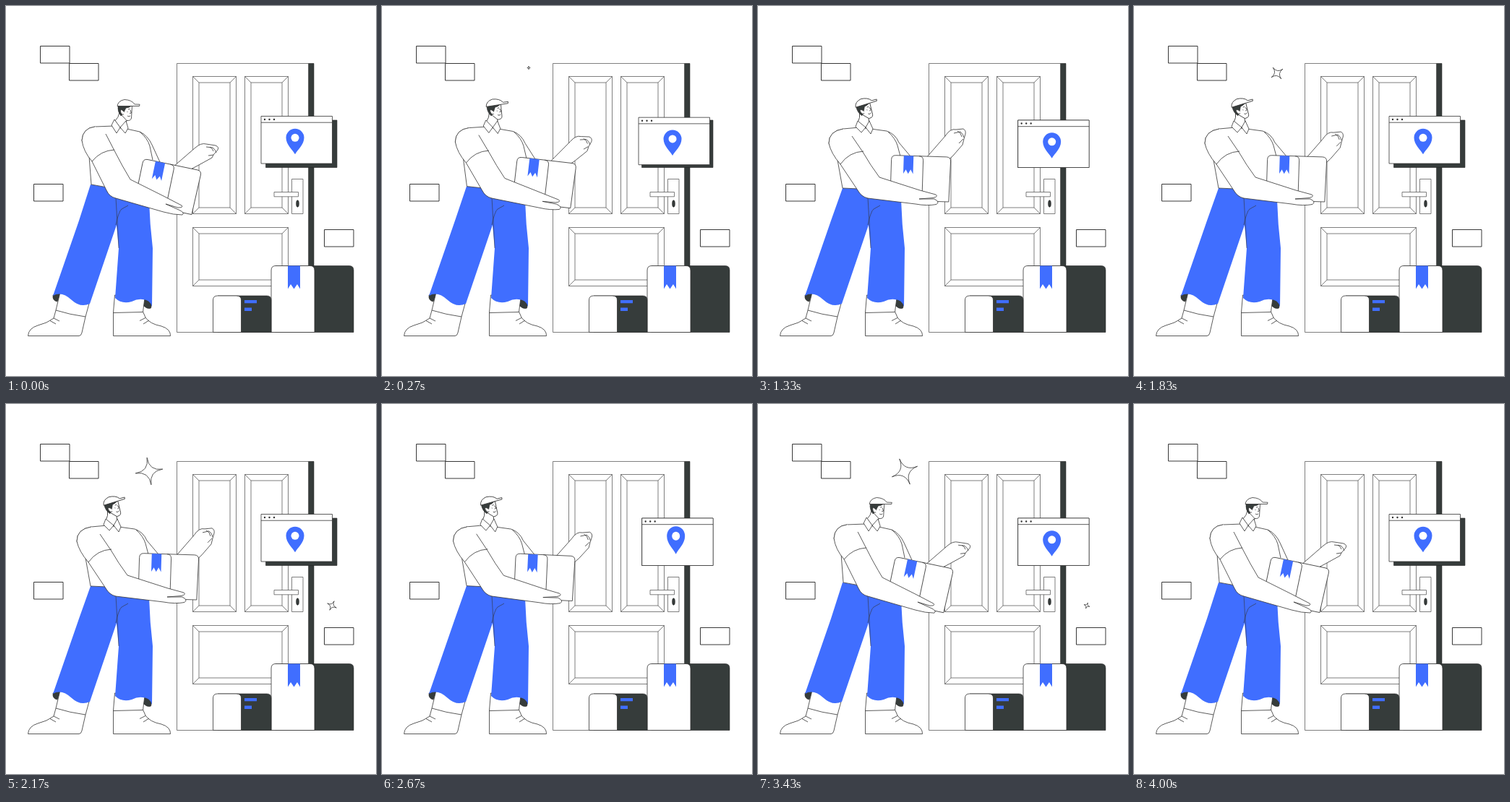
Animation, 512 px wide and 512 px high, one loop 4.03 s. Source, as an HTML page:

```html
<!DOCTYPE html>
<html lang="en">
<head>
<meta charset="utf-8">
<title>Delivery at the door</title>
<style>
  html, body { margin: 0; width: 100%; height: 100%; overflow: hidden; background: #fff; }
  svg { display: block; width: 100vw; height: 100vh; }
  path, rect, ellipse, circle { fill: #fff; stroke: #333; stroke-width: .8; stroke-linejoin: round; }
  .line { fill: none; }
  .thin > * { stroke: #555; stroke-width: .75; }
  .edge { stroke: #222; stroke-width: .9; }
  .dark { fill: #363c3b; stroke: #222; stroke-width: .6; }
  .blue { fill: #406eff; stroke: none; }
</style>
</head>
<body>
<svg viewBox="0 0 512 512">
  <!-- bricks -->
  <path class="edge" d="M47.5 55.5h40.5v23.5h-40.5zM87.5 79.5h40.5v23.5h-40.5zM38.5 246.5h40.5v23.5h-40.5zM440.5 309.5h40.5v23.5h-40.5z"/>

  <!-- door -->
  <rect class="dark" x="418" y="79.5" width="8" height="372"/>
  <g class="thin">
    <rect x="236.5" y="79.5" width="182" height="372"/>
    <g id="panels" class="thin"></g>
    <rect x="395.5" y="239.5" width="15.5" height="48"/>
    <rect x="371" y="257.5" width="33.5" height="6.3"/>
  </g>
  <ellipse class="dark" cx="403.5" cy="273.5" rx="1.9" ry="4.8"/>

  <!-- parcels on the floor -->
  <path class="dark" d="M373 359.5H475q6 0 6 6V451.5H373z"/>
  <path d="M367 451.5V366q0-6.5 6-6.5h48q6 0 6 6.5V451.5z"/>
  <path class="blue" d="M390 359.5h17v32l-4-6.5-4.5 6.5-4.5-6.5-4 6.5z"/>
  <path class="dark" d="M293 401H361q6 0 6 6V451.5H293z"/>
  <path d="M286.5 451.5V407q0-6 6-6h26.5q6.5 0 6.5 6V451.5z"/>
  <path class="blue" d="M330 407h17v4.2h-17zM330 417.5h10v4.5h-10z"/>

  <!-- map window -->
  <rect class="dark" x="359.5" y="158" width="98.5" height="65.5"/>
  <g id="window">
    <rect x="353" y="152.5" width="98.5" height="65.5"/>
    <path class="line" d="M353 161.2h98.5"/>
    <path class="line" d="M358 157h0M364.5 157h0M371 157h0" style="stroke-width:2.4;stroke-linecap:round"/>
    <g id="pin">
      <path class="blue" d="M0 0C-3 -6 -12.5 -13 -12.5 -23A12.5 12.5 0 0 1 12.5 -23C12.5 -13 3 -6 0 0z"/>
      <circle cx="0" cy="-23" r="5.5" style="stroke:none"/>
    </g>
  </g>

  <path id="starA"/>
  <path id="starB"/>

  <!-- courier -->
  <g id="hand"><path id="farArm"/><path id="fingers" class="line"/></g>

  <path class="dark" d="M65 400Q64 408 71 409L76 396z"/>
  <path d="M75 396L69 421L66 432Q57 439 44 442Q31 446 30.5 456.5H101Q104 456.5 105 452L110 430L116 408z"/>
  <path class="line" d="M69 421Q88 427 110 430M66 432L74 436M61 435.5L69 440"/>
  <path class="dark" d="M189 404Q200 406 201.5 413L200.5 418Q195 420 190 414z"/>
  <path d="M150.5 400L148.5 424V456.5H227.5Q228 447 215 443Q199 440 193 431L189.5 423L192 404z"/>
  <path class="line" d="M148.5 424.5L189.5 423.5M193 431.5L185 435.5M198 435L190 440"/>
  <path id="trousers" class="blue"/>
  <path class="line" style="stroke-width:.6" d="M152 265L156 335M152 303Q156 284 160 281L169 276"/>

  <path id="body"/>
  <path id="farSleeve" class="line"/>
  <g id="parcel">
    <path d="M0 62V6Q0 0 6 0H76Q82 0 82 6L81 62z"/>
    <path class="line" d="M38 0Q44 0 44 6V62"/>
    <path class="blue" d="M17 0h13.5v25l-3.5-6-3.3 6-3.3-6-3.4 6z"/>
  </g>
  <path id="nearArm"/>
  <path id="cuff" class="line"/>
  <g id="head">
    <path d="M157 147Q156 154 151 159L158 169L165 168L167 157z"/>
    <path d="M158 139L174.5 138.500L173.500 155Q173 159 167 158.5L160 151z"/>
    <path class="dark" d="M155 138L173 138.5Q170 141 166 141L163 147L159 152Q154 146 155 138z"/>
    <path d="M163 146Q158 141 158.500 146Q159.500 151 163 150"/>
    <path class="line" d="M169 143l2.500-.5M172 144l1.500 4-2.500.5M168 152q2 2 4 0M168 146v1"/>
    <path d="M154 138.500Q155 131 164 129.500Q174 130 178 136L185 136.200L184.500 138.500z"/>
  </g>
  <path id="collar"/>
</svg>
<script>
const LOOP = 4030;
const $ = id => document.getElementById(id);
const place = (id, value) => $(id).setAttribute('transform', value);
const lerp = (a, b, k) => a + (b - a) * k;

// Smooth 0..1 between times a and b
function ramp(t, a, b) {
  const x = Math.min(1, Math.max(0, (t - a) / (b - a)));
  return x * x * (3 - 2 * x);
}

// Each shape as it is leaning forward, then standing upright
const poses = {
  farArm: [
    'M232 222L262 196Q270 189 277 191L290 193Q295 195 293 199L287 206L285 210L265 221L248 230',
    'M232 211L259 180Q266 169 274 171L284 170Q288 172 287 177L285 184L283 192L270 207L258 218'],
  fingers: [
    'M277 195L286 196Q290 199 291 203M287 206L280 207M282 195Q286 197 287 201',
    'M271 176L280 174Q284 177 285 182M284 184L278 190M276 173Q281 175 282 181'],
  trousers: [
    'M117 247L140 251L198 270Q199 302 203 335L202 416Q199 406 189 406Q182 405 174 409Q160 413 151 404L156 335L153 303L116 412Q103 418 91 407Q77 394 65 401L101 297z',
    'M117 252L140 253L198 268Q199 302 203 335L202 416Q199 406 189 406Q182 405 174 409Q160 413 151 404L156 335L153 303L116 412Q103 418 91 407Q77 394 65 401L101 297z'],
  body: [
    'M105 186Q106 169 123 167L150 166L167 170L185 174Q196 179 202 192L213 216L200 245L198 262L152 264L140 251L118 247L115 208z',
    'M98 190Q98 173 118 170L140 168L156 170L178 173Q190 177 195 189L211 208L200 240L198 260L152 264L140 253L117 252L110 213z'],
  farSleeve: [
    'M185 174Q196 183 199 194L203 213',
    'M180 174Q190 183 193 193L197 208'],
  nearArm: [
    'M138 177L152 204Q160 220 172 240L218 263L243 276Q246 279 238 279L221 274L239 282Q248 286 244 289Q232 289 218 285L152 266Q143 264 139 255L119 215Q107 201 105 186Q106 169 123 167',
    'M130 180L145 202Q156 221 168 237L224 255L246 261Q250 264 242 265.5L223 267L244 267Q252 271 247 274.5Q234 277 218 274L152 266Q143 264 138 255L114 219Q101 204 98 190Q98 173 118 170'],
  cuff: [
    'M119 215Q131 200 150 199',
    'M114 219Q126 202 146 201'],
  collar: [
    'M150 157L146 165L153 176L158 168L165 176L169 169L166 159L158 168z',
    'M138 159L135 167L143 175L149 168L156 177L159 170L154 159L149 168z'],
};
const number = /-?[\d.]+/g;
for (const id in poses) poses[id][1] = poses[id][1].match(number).map(Number);

function panel(x, y, right, bottom) {
  const [a, b, c, d] = [x + 8.5, y + 8.5, right - 8.5, bottom - 8.5];
  return `<path d="M${x} ${y}H${right}V${bottom}H${x}zM${a} ${b}H${c}V${d}H${a}z` +
    `M${x} ${y}L${a} ${b}M${right} ${y}L${c} ${b}M${x} ${bottom}L${a} ${d}M${right} ${bottom}L${c} ${d}"/>`;
}
$('panels').innerHTML = panel(258.5, 97.5, 318.5, 287.5) +
  panel(330.5, 97.5, 390.5, 287.5) + panel(258.5, 306.5, 390.5, 387.5);

// Four points joined by curves pulled to the centre
function star(id, x, y, radius, turn) {
  let d = '';
  for (let i = 0; i <= 4; i++) {
    const a = (turn + i * 90) * Math.PI / 180;
    d += `${i ? `Q${x} ${y} ` : 'M'}${x + radius * Math.cos(a)} ${y + radius * Math.sin(a)}`;
  }
  $(id).setAttribute('d', radius > .2 ? d : '');
}

// Linear growth to a peak, then shrinking away
const twinkle = (p, start, peak, end) =>
  Math.max(0, Math.min((p - start) / (peak - start), (end - p) / (end - peak)));

function drawCourier(t) {
  const k = 1.25 * ramp(t, 40, 560) - .25 * ramp(t, 580, 1050)
    - 1.04 * ramp(t, 2580, 3120) + .04 * ramp(t, 3150, 3600);
  for (const id in poses) {
    const [lean, upright] = poses[id];
    let i = 0;
    $(id).setAttribute('d', lean.replace(number, n => lerp(+n, upright[i++], k).toFixed(2)));
  }
  place('head', `translate(${-19 * k} ${1.8 * k}) rotate(${-17 * k} 154 138)`);
  place('parcel', `translate(${lerp(190.3, 184.8, k)} ${lerp(211.3, 206.5, k)}) rotate(${lerp(11.8, 1.8, k)})`);

  const knock = (1 - Math.cos((t - 1330) / 300 * 2 * Math.PI)) / 2 *
    ramp(t, 350, 560) * (1 - ramp(t, 2700, 2950));
  place('hand', `translate(${3 * knock} ${5.5 * knock})`);
}

function drawWindow(t) {
  const c = t % (LOOP / 2);
  const press = ramp(c, 150, 480) - ramp(c, 1400, 1740);
  place('window', `translate(${6.7 * press} ${5.5 * press})`);
  const x = Math.min(1, Math.max(0, (c - 300) / 620));
  const jump = Math.sin(Math.PI * x) ** 2;
  place('pin', `translate(400 ${205.3 - 3.3 * jump}) scale(1 ${1 + .09 * jump})`);
}

function drawStars(t) {
  const period = LOOP / 3, p = t % period, n = Math.floor(t / period);
  const spin = (p - 500) * .08;
  star('starA', [203, 198, 203][n], [85.5, 93, 93.5][n], 21 * twinkle(p, 210, 800, 1090), [17, 55, 48][n] + spin);
  star('starB', [457, 451, 455][n], 279, 10 * twinkle(p, 460, 900, 1290) ** 2, spin);
}

function frame(now) {
  const t = now % LOOP;
  drawCourier(t);
  drawWindow(t);
  drawStars(t);
  requestAnimationFrame(frame);
}
frame(0);
</script>
</body>
</html>
```
